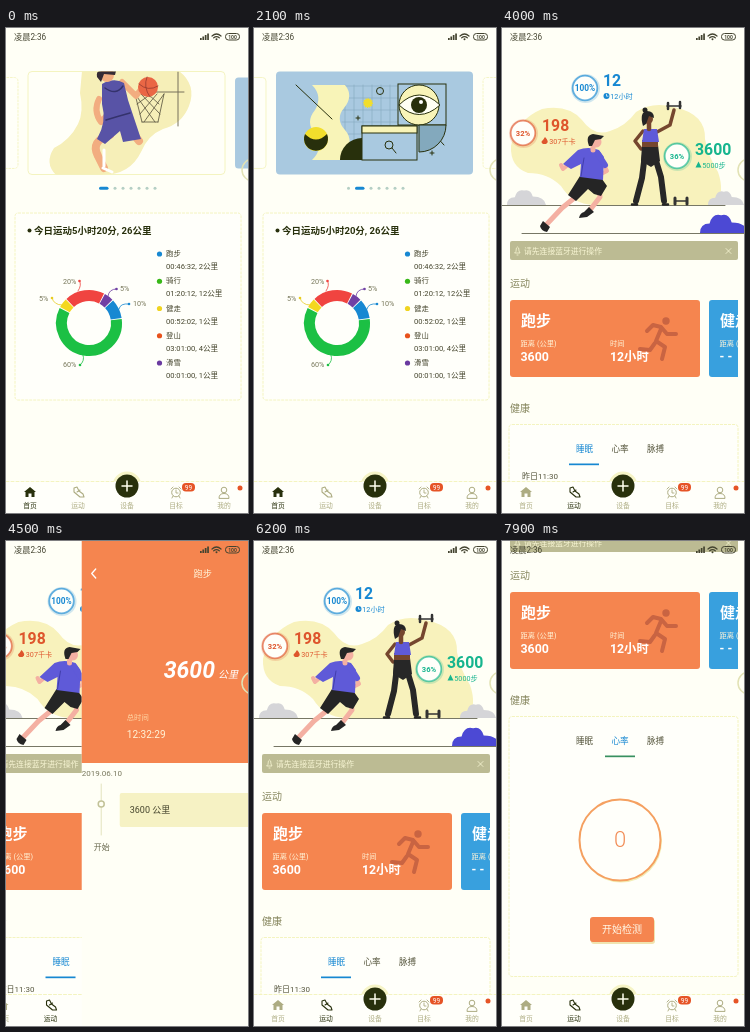
Write an HTML page that moves like this. It is 242 px wide and 485 px high and loops after 8000 ms.

```html
<!DOCTYPE html>
<html lang="zh">
<head>
<meta charset="utf-8">
<title>运动</title>
<style>
  html, body { margin: 0; width: 100%; height: 100%; overflow: hidden; background: #fffff6; }
  svg { display: block; width: 100vw; height: 100vh; }
  text { font-family: Roboto, "Noto Sans CJK SC", "Noto Sans CJK", sans-serif; white-space: pre; }
</style>
</head>
<body>
<svg id="stage" viewBox="0 0 242 485"></svg>
<script>
const BG = '#fffff6', INK = '#28300c', BLUE = '#1788d2', GREEN = '#1cc044', RED = '#f04440',
  ORANGE = '#f5854f', EDGE = '#f4f4c0', VIOLET = '#5f5ad8', MUTED = '#adac82', SKIN = '#f4b0a2', BROWN = '#75462e';
const TAU = Math.PI * 2;

const text = (x, y, str, size, fill = INK, more = '') =>
  `<text x="${x}" y="${y}" font-size="${size}" fill="${fill}" ${more}>${str}</text>`;
const rect = (x, y, w, h, fill, r = 0, more = '') =>
  `<rect x="${x}" y="${y}" width="${w}" height="${h}" rx="${r}" fill="${fill}" ${more}/>`;
const dot = (x, y, r, fill, more = '') => `<circle cx="${x}" cy="${y}" r="${r}" fill="${fill}" ${more}/>`;
const shape = (d, fill, more = '') => `<path d="${d}" fill="${fill}" ${more}/>`;
const line = (d, stroke, w = 1, more = '') =>
  `<path d="${d}" fill="none" stroke="${stroke}" stroke-width="${w}" stroke-linecap="round" stroke-linejoin="round" ${more}/>`;
const group = (id, body, more = '') => `<g id="${id}" ${more}>${body}</g>`;
const bold = 'font-weight="700"', middle = 'text-anchor="middle"';
const panel = (x, y, w, h) => rect(x, y, w, h, '#fffffa', 3, `stroke="${EDGE}" stroke-dasharray="3 1"`);

function statusBar() {
  const bars = [2, 3.5, 5, 6.5].map((h, i) => rect(194 + i * 2.4, 12 - h, 1.7, h, '#444430')).join('');
  return text(8, 12, '凌晨2:36', 8.2, '#444430') + bars +
    line('M206 8Q210.500 4 215 8M207.700 9.800Q210.500 7.300 213.300 9.800', '#444430', 1.2) +
    dot(210.5, 11.3, 1, '#444430') +
    rect(219.5, 5.5, 14, 6.5, 'none', 3, 'stroke="#444430" stroke-width="1"') +
    text(226.5, 10.8, '100', 5, '#444430', bold + ' ' + middle);
}

// Slides are drawn around the centre of a 197 x 103 card.
function basketballSlide() {
  const art = shape('M76 43H173Q191 57 183 78Q176 96 157 101Q142 107 135 124Q124 147 96 147H50Q38 135 48 120Q64 112 72 96Q78 84 74 65Z', '#f6efb8') +
    line('M130 64H178M172 44V98', '#77705a', 1) +
    line('M129 66L136 94M158 66L152 94M129 66L149 94M135 66L154 86M142 66L153 76M158 66L138 94M151 66L134 86M145 66L131 76M136 94H152', '#55503c', .8) +
    line('M93 71Q87 83 95 94L104 84', '#f2ad80', 6) +
    line('M116 54L130 68L139 56', '#f2ad80', 6) +
    line('M104 107Q84 113 92 128L98 140M126 104L133 113', '#f2ad80', 8) +
    shape('M96 56Q108 49 118 55L122 72L131 99L135 111L117 114L114 103L99 116L91 111Q101 94 96 76Z', '#5853a6') +
    line('M99 60Q110 68 117 58M100 92Q113 88 124 85', '#34326c', 1.5) +
    dot(101, 47, 7, '#f2ad80') + shape('M91 49Q90 43 94 43H110L109 47L98 46L95 54Z', '#352b35') +
    line('M97 140L106 144M98 122V138', '#fff', 3) +
    dot(142, 59, 10, '#ea6745') + line('M133 56Q142 64 152 58M141 49Q137 59 144 69', '#963b30', .8);
  return rect(-98.5, -51.5, 197, 103, '#fffff8', 4, `stroke="${EDGE}"`) +
    `<g transform="translate(-120.500 -95)" clip-path="url(#slideClip)">${art}</g>`;
}

function posterSlide() {
  let grid = '';
  for (let i = 0; i < 7; i++) grid += `M${91 + i * 9} 57V131M88 ${58 + i * 12}H146`;
  const art = line(grid, '#83a9bd', .6) +
    shape('M58 57H91Q100 68 90 80Q81 91 91 102Q101 113 90 132H58Q71 119 61 106Q51 94 61 82Q69 68 58 57Z', '#f8f4b8') +
    line('M42 57L78 91M180 106L190 117', INK, 1) +
    dot(62, 111, 12, '#f2de2c') + shape('M51 106A12 12 0 1 0 73 106Q62 117 51 106Z', INK) +
    dot(114, 75, 4, '#f2de2c', 'stroke="#f2de2c" stroke-dasharray="1 1" stroke-width="2"') +
    dot(126, 63, 3.5, 'none', `stroke="${INK}"`) +
    rect(144, 56, 48, 41, '#a9c9e0', 0, `stroke="${INK}"`) + dot(165, 77, 20, '#f8f4b8', `stroke="${INK}"`) +
    shape('M145 77Q165 57 186 77Q165 96 145 77Z', '#fffff4', `stroke="${INK}"`) +
    dot(165, 77, 8, INK) + dot(167, 74, 2, '#fff') +
    shape('M165 97H192A27 27 0 0 1 165 124Z', '#83a9bd', `stroke="${INK}"`) + shape('M86 132A22 22 0 0 1 108 110V132Z', INK) +
    rect(108, 98, 55, 34, '#a9c9e0', 0, `stroke="${INK}"`) + rect(108, 98, 55, 7, '#f8f4b8', 0, `stroke="${INK}"`) +
    dot(135, 117, 4, 'none', `stroke="${INK}"`) + line('M138 120L142 125M176 125H180M178 123V127M102 90H106M104 88V92', INK, 1);
  return rect(-98.5, -51.5, 197, 103, '#a9c9e0', 4) + `<g transform="translate(-120.500 -95)">${art}</g>`;
}

const blankSlide = () => rect(-98.5, -51.5, 197, 103, '#fffff8', 4, `stroke="${EDGE}" stroke-dasharray="3 1"`);

function donut() {
  let angle = -8;
  return [[60, GREEN], [5, '#f4d820'], [20, RED], [5, '#7040a4'], [10, BLUE]].map(([share, color]) => {
    const point = a => `${83 + 27.5 * Math.cos(a * TAU / 360)} ${295 + 27.5 * Math.sin(a * TAU / 360)}`;
    const start = angle + .9;
    angle += share * 3.6;
    return `<path d="M${point(start)}A27.500 27.500 0 ${share > 50 ? 1 : 0} 1 ${point(angle - .9)}" fill="none" stroke="${color}" stroke-width="11"/>`;
  }).join('');
}

function callout(label, x, y, color, dotX, dotY, path) {
  return text(x, y, label, 7.2, '#77775a') + line(path, color, .8) + dot(dotX, dotY, 1.3, color);
}

function homePage() {
  const legend = [['跑步', '00:46:32, 2公里', BLUE], ['骑行', '01:20:12, 12公里', '#38b818'],
    ['健走', '00:52:02, 1公里', '#f0d420'], ['登山', '03:01:00, 4公里', '#e8521c'], ['滑雪', '00:01:00, 1公里', '#6a3aa0']]
    .map(([name, amount, color], i) => {
      const y = 226 + i * 27.25;
      return dot(153.5, y, 2.6, color) + text(160, y + 2, name, 7.4, '#44442c') + text(160, y + 15, amount, 7.6, '#44442c');
    }).join('');
  const slides = [blankSlide(), basketballSlide(), posterSlide(), blankSlide()]
    .map((s, i) => group('slide' + i, s)).join('');
  const pager = Array.from({ length: 7 }, (_, i) => rect(0, 158.7, 3, 3, '#b5cfc4', 1.5, `id="page${i}"`)).join('');
  return slides + pager + panel(9, 185, 226, 187) +
    dot(23.5, 202.5, 2, INK) + text(28, 206, '今日运动5小时20分, 26公里', 9.5, INK, bold) + donut() +
    callout('20%', 57, 256, RED, 73.5, 253, 'M73.500 253Q76 257 72 263') +
    callout('5%', 33, 273, '#e8cc20', 46, 270, 'M46 270Q48 277 56 277') +
    callout('5%', 114, 263, '#7040a4', 110.5, 261, 'M110.500 261Q103 261 102 268') +
    callout('10%', 127, 278, BLUE, 123, 276, 'M123 276Q114 275 113 281') +
    callout('60%', 57, 339, GREEN, 74, 337, 'M74 337Q79 333 77 327') + legend;
}

function runner() {
  return line('M76 167L60 180L44 197', SKIN, 5) + line('M97 160L98 169L88 182', SKIN, 5) +
    shape('M41 193L48 199L45 204Q39 203 38 198Z', '#252525') + shape('M87 179L92 184L85 189L77 190Q78 185 82 184Z', '#252525') +
    line('M67 136L61 141L59 137M100 133L105 143L97 147', SKIN, 4) +
    shape('M78 148L100 151L105 158L99 168L92 166L86 161L74 173L66 167Z', '#252525') +
    shape('M76 122Q86 118 97 122L102 129L101 152L78 149L79 136L69 141L61 136Z', VIOLET) +
    line('M96 126L103 137', VIOLET, 6) + line('M82 130L79 148', '#3936a0', .8) +
    line('M91 117V122', SKIN, 5) + dot(94, 114, 5.5, SKIN) +
    shape('M87 118Q83 107 91 106L102 108L99 111L93 112L90 118Z', '#252525');
}

function athlete() {
  return line('M155 104L168 97L172 82', BROWN, 3.5) + line('M141 103L133 113L139 121', BROWN, 3.5) +
    line('M165 78H179', '#333', 1.5) + line('M166 75V81M178 74V80', '#333', 2.5) +
    line('M143 126L140 150L134 173M152 126L159 149L162 173', '#272727', 6) +
    shape('M140 117H156L158 133L149 139L139 133Z', '#272727') + shape('M140 112H156V119H140Z', BROWN) +
    shape('M142 101L155 101L157 114L140 114Z', VIOLET) + line('M147 94V101', BROWN, 4.5) +
    dot(146, 91, 5, BROWN) + shape('M141 98Q137 84 145 83Q152 83 152 90L147 88L144 96Z', '#252525') +
    dot(143, 82, 2.5, '#252525') + line('M130 176.500H135M161 176.500H166', '#252525', 2.5);
}

const bush = (x, y, w, color) =>
  shape(`M${x} ${y}q0-${w * .2} ${w * .2}-${w * .2}q${w * .06}-${w * .22} ${w * .24}-${w * .17}q${w * .16}-${w * .05} ${w * .22} ${w * .15}q${w * .3} 0 ${w * .34} ${w * .22}z`, color);

const gauges = [
  { x: 83, y: 60, percent: '100%', color: BLUE, tx: 101, ty: 58, value: '12', note: '12小时' },
  { x: 21, y: 105, percent: '32%', color: '#de552c', tx: 40, ty: 103, value: '198', note: '307千卡' },
  { x: 175, y: 128, percent: '36%', color: '#16b58e', tx: 193, ty: 127, value: '3600', note: '5000步' }
];
const gaugeView = (g, i) => dot(g.x + .5, g.y + .5, 14.5, g.color, 'opacity=".2"') +
  dot(g.x, g.y, 12.3, '#fffffa', `stroke="${g.color}" stroke-opacity=".65" stroke-width="1.800"`) +
  text(g.x, g.y + 2.8, g.percent, i ? 7.6 : 8.3, g.color, `${bold} ${middle}`) +
  text(g.tx, g.ty, g.value, 15.8, g.color, bold) +
  [dot(g.tx + 3.5, g.ty + 10, 3, g.color) + line(`M${g.tx + 3.5} ${g.ty + 8.2}v2h1.500`, '#fff', .7),
   shape(`M${g.tx + 3} ${g.ty + 6}q5 5 1 7h-3q-3-2 0-4z`, g.color),
   shape(`M${g.tx + 3.5} ${g.ty + 6.500}l3 6h-6z`, g.color)][i] +
  text(g.tx + 7.3, g.ty + 12.5, g.note, 7.2, g.color);

function workoutCard(x, w, color, name, distance, time) {
  return rect(x, 272, w, 77, color, 3) + text(x + 11, 298, name, 15, '#fff', bold) +
    text(x + 10.5, 318, '距离 (公里)', 7.3, '#fff4d8') + text(x + 10.5, 333, distance, 12.4, '#fff', bold) +
    text(x + 100, 318, '时间', 7.3, '#fff4d8') + text(x + 100, 333, time, 12.3, '#fff', bold);
}

function sportPage() {
  const hero = shape('M9 118Q14 92 40 81Q66 76 80 92Q92 109 108 103Q124 98 134 84Q150 73 172 79Q204 86 203 111Q206 128 216 144Q223 164 214 177H92Q70 176 59 158Q46 145 26 145Q8 139 9 118Z', '#f8f2bc') +
    bush(5, 177, 39, '#d5d5d8') + bush(206, 177, 36, '#d5d5d8') + bush(198, 205, 48, '#4c49d4') +
    line('M0 177.500H223M20 205.500H242', '#555540', .8) +
    line('M173 173H185', '#333', 1.5) + line('M173 170V176M185 170V176', '#333', 3) + athlete() + runner();
  const notice = rect(8, 213, 228, 19, '#bcbb93', 2) +
    line('M13 225H18L17 223Q17 219 15.500 219Q14 219 14 223ZM15 227H16M224 220.500L229 225.500M229 220.500L224 225.500', '#f8f6d4', .8) +
    text(22, 226, '请先连接蓝牙进行操作', 7.8, '#f8f6d4');
  const sprinter = dot(164, 293, 3.7, '#c96442') +
    line('M145 303L151 297L159 299L165 306L174 306M159 301L154 313L163 319L160 331M153 315L148 322L138 321', '#c96442', 4);
  const cards = `<g clip-path="url(#cardClip)">${workoutCard(8, 190, ORANGE, '跑步', '3600', '12小时') + sprinter + workoutCard(207, 190, '#38a0de', '健走', '- -', '- -')}</g>`;
  const health = panel(7, 396.5, 229, 260) +
    ['睡眠', '心率', '脉搏'].map((name, i) => text(82.5 + i * 35.5, 424, name, 8.6, INK, `${middle} id="health${i}"`)).join('') +
    rect(67, 435.5, 30, 1.7, BLUE, 0, 'id="underline"') +
    `<g clip-path="url(#healthClip)">` +
    group('sleep', text(20, 451, '昨日11:30', 8, '#55553c')) +
    group('heart', dot(119, 521.5, 41, '#f3edb5') + dot(118, 520, 40.5, '#fffffa', 'stroke="#f5a060" stroke-width="2"') +
      text(118, 527, '0', 22, '#f28c55', middle + ' font-weight="300"') +
      rect(89, 599, 64, 25, '#f0e4b0', 3) + rect(88, 597, 64, 25, ORANGE, 3) + text(120, 613, '开始检测', 10, '#fff8e8', middle)) + '</g>';
  return rect(0, 0, 242, 700, BG) + hero + gauges.map(gaugeView).join('') + notice +
    text(8, 259, '运动', 10, '#85855c') + cards + text(8, 384, '健康', 10, '#85855c') + health;
}

function tabBar() {
  const tab = (id, x, label, icon) => group(id, icon + text(x, 479.5, label, 6.8, 'currentColor', middle), `color="${MUTED}"`);
  return dot(121, 458, 14.5, '#f6f4c6') + rect(0, 453, 242, 32, '#fffffa') +
    line('M0 453.500H242', EDGE, 1, 'stroke-dasharray="3 2"') +
    tab('tabHome', 24, '首页', shape('M24 459L30 464H28.500V469H25.500V465.500H22.500V469H19.500V464H18Z', 'currentColor')) +
    tab('tabSport', 72, '运动', line('M68 460L71 459L73 463L77 466L78 469L74 469L68 464ZM71 464L74 462', 'currentColor', 1.1)) +
    tab('tabDevice', 121, '设备', '') +
    tab('tabGoal', 170, '目标', dot(170, 464.5, 4.3, 'none', 'stroke="currentColor"') + line('M170 462V465H172M165 461L167 459M175 461L173 459M167 468L166 470M173 468L174 470', 'currentColor', .9)) +
    tab('tabMine', 218, '我的', dot(218, 462, 2.8, 'none', 'stroke="currentColor"') + line('M213 470Q213 465.500 218 465.500Q223 465.500 223 470Z', 'currentColor')) +
    dot(121, 458, 11.5, INK) + line('M116 458H126M121 453V463', '#fffff0', 1.5) +
    rect(176, 455, 13, 8.5, '#e65426', 4) + text(182.5, 461.8, '99', 6.5, '#fff', middle) + dot(234, 460, 2.5, '#e65426');
}

function detailPage() {
  return rect(0, 0, 242, 485, BG) + rect(0, 0, 242, 222, ORANGE) +
    line('M14 28L10 32.500L14 37', '#fff', 1.3) + text(121, 36, '跑步', 9.2, '#fff4d8', middle) +
    text(82, 137, '3600<tspan font-size="10" font-weight="400" dx="3">公里</tspan>', 23, '#fff', bold + ' font-style="italic"') +
    text(45, 179, '总时间', 7.4, '#ffd9a8') + text(45, 197, '12:32:29', 10.1, '#fff4d8') +
    text(0, 235, '2019.06.10', 8, '#77775c') + line('M19.500 243V294', '#dcdcb0', .8) +
    dot(19.5, 263, 3, '#fffff4', 'stroke="#c2c298" stroke-width="1.500"') +
    rect(38, 252, 220, 34, '#f6f2c4', 2) + text(48, 272, '3600 公里', 9, '#44442c') + text(12, 309, '开始', 8, '#66664c');
}

const stage = document.getElementById('stage');
stage.innerHTML = `<defs><clipPath id="slideClip">${rect(22, 43.5, 197, 103, '#000', 4)}</clipPath>
  <clipPath id="cardClip">${rect(0, 270, 236, 82, '#000')}</clipPath>
  <clipPath id="healthClip">${rect(8, 438, 227, 217, '#000')}</clipPath></defs>` +
  rect(0, 0, 242, 485, BG) +
  group('main', group('home', homePage()) + group('sport', sportPage()) + tabBar()) +
  group('detail', detailPage()) + dot(247, 142, 11, 'none', 'stroke="#e2e2b4" stroke-width="1.500"') + statusBar();

const $ = id => document.getElementById(id);
const set = (id, name, value) => $(id).setAttribute(name, value);
const move = (id, x, y = 0, scale = 1) => set(id, 'transform', `translate(${x} ${y}) scale(${scale})`);
const show = (id, on) => set(id, 'display', on ? 'inline' : 'none');
const clamp = v => Math.max(0, Math.min(1, v));
const ease = (t, from, to) => { const p = clamp((t - from) / (to - from)); return p * p * (3 - 2 * p); };

function draw(t) {
  const onSport = t >= 2700;
  show('home', !onSport);
  show('sport', onSport);
  set('tabHome', 'color', onSport ? MUTED : INK);
  set('tabSport', 'color', onSport ? INK : MUTED);

  const page = ease(t, 1500, 1950);
  for (let i = 0; i < 4; i++) {
    const offset = i - 1 - page;
    move('slide' + i, 120.5 + offset * 195.5, 95, 1 - .117 * Math.min(1, Math.abs(offset)));
  }
  let x = 93;
  for (let i = 0; i < 7; i++) {
    const active = Math.max(0, 1 - Math.abs(i - page)), width = 3 + 6.5 * active;
    set('page' + i, 'x', x);
    set('page' + i, 'width', width);
    set('page' + i, 'fill', active > .5 ? BLUE : '#b5cfc4');
    x += width + 5;
  }

  const push = ease(t, 4250, 4650) - ease(t, 5110, 5500);
  move('main', -40 * push);
  move('detail', 242 * (1 - push));
  show('detail', push > 0);

  move('sport', 0, -221 * ease(t, 6280, 6700));
  const swap = ease(t, 6950, 7200);
  move('sleep', -229 * swap);
  move('heart', 229 * (1 - swap));
  set('underline', 'x', 67 + 36 * swap);
  set('underline', 'fill', swap > .5 ? '#389060' : BLUE);
  for (let i = 0; i < 3; i++) set('health' + i, 'fill', i === Math.round(swap) ? BLUE : '#55553c');
}

function tick() {
  draw(performance.now() % 8000);
  requestAnimationFrame(tick);
}
tick();
</script>
</body>
</html>
```
